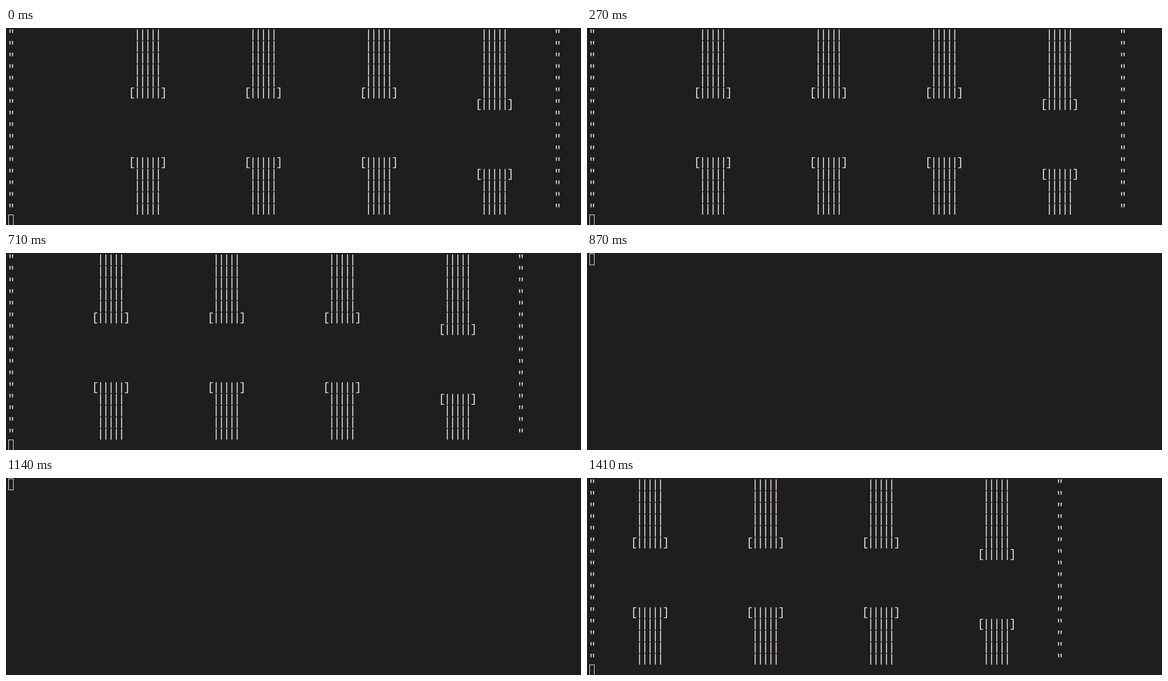
Animation, 985 px wide and 339 px high, one loop 1500 ms. Source, as an HTML page with a canvas:

```html
<!DOCTYPE html>
<html lang="en">
<head>
<meta charset="utf-8">
<title>Terminal pipes</title>
<style>
  html, body { margin: 0; width: 100%; height: 100%; overflow: hidden; background: #1e1e1e; }
  canvas { display: block; }
</style>
</head>
<body>
<canvas id="term" width="985" height="339"></canvas>
<script>
const ctx = document.getElementById('term').getContext('2d', { alpha: false });
const LOOP = 1500, CELL = 9, LINE = 20, LEFT = 4, TOP = 1, ROWS = 16;
const CLEAR = -1;

// [start in ms, columns scrolled]; CLEAR is the wiped screen between redraws
const steps = [
  [0, 0], [20, CLEAR], [50, 1], [130, CLEAR], [160, 2], [240, CLEAR],
  [270, 3], [320, CLEAR], [360, 4], [470, CLEAR], [490, 4],
  [610, 5], [660, 6], [710, 7], [790, CLEAR], [810, 8], [870, CLEAR],
  [890, 9], [970, 10], [1070, 11], [1140, CLEAR], [1170, 12],
  [1250, 13], [1310, CLEAR], [1330, 14], [1410, 15]
];

// Left column of each pipe and the rows of its two caps
const pipes = [[23, 5, 11], [45, 5, 11], [67, 5, 11], [89, 6, 12]];
const BORDER = 104;

// Subpixel text: each colour channel is added to the background a third of a pixel apart
const channels = [['#c20000', 1 / 3], ['#00c200', 0], ['#0000c2', -1 / 3]];

function print(text, col, row, dx) {
  [...text].forEach((ch, i) => {
    if (ch !== ' ') ctx.fillText(ch, LEFT + (col + i) * CELL + 5 + dx, TOP + row * LINE + 16);
  });
}

function cursor(row) {
  ctx.globalCompositeOperation = 'source-over';
  ctx.strokeStyle = '#e0e0e0';
  ctx.strokeRect(LEFT + 0.5, TOP + row * LINE + 0.5, CELL - 1, LINE - 1);
}

function printField(shift, dx) {
  for (let row = 0; row < ROWS; row++) {
    print('"', 0, row, dx);
    print('"', BORDER - shift, row, dx);
    for (const [col, upper, lower] of pipes) {
      if (row === upper || row === lower) print('[|||||]', col - shift, row, dx);
      else if (row < upper || row > lower) print(' ||||| ', col - shift, row, dx);
    }
  }
}

function draw(shift) {
  ctx.globalCompositeOperation = 'source-over';
  ctx.fillStyle = '#1e1e1e';
  ctx.fillRect(0, 0, 985, 339);
  if (shift === CLEAR) return cursor(0);

  ctx.globalCompositeOperation = 'lighter';
  ctx.font = '20px "Liberation Mono", monospace';
  ctx.textAlign = 'center';
  ctx.textRendering = 'geometricPrecision';
  for (const [color, dx] of channels) {
    ctx.fillStyle = color;
    printField(shift, dx);
  }
  cursor(ROWS);
}

let shown = null;
function tick() {
  const t = performance.now() % LOOP;
  const step = steps.findLast(([start]) => start <= t);
  if (step !== shown) draw((shown = step)[1]);
  requestAnimationFrame(tick);
}
tick();
</script>
</body>
</html>
```
